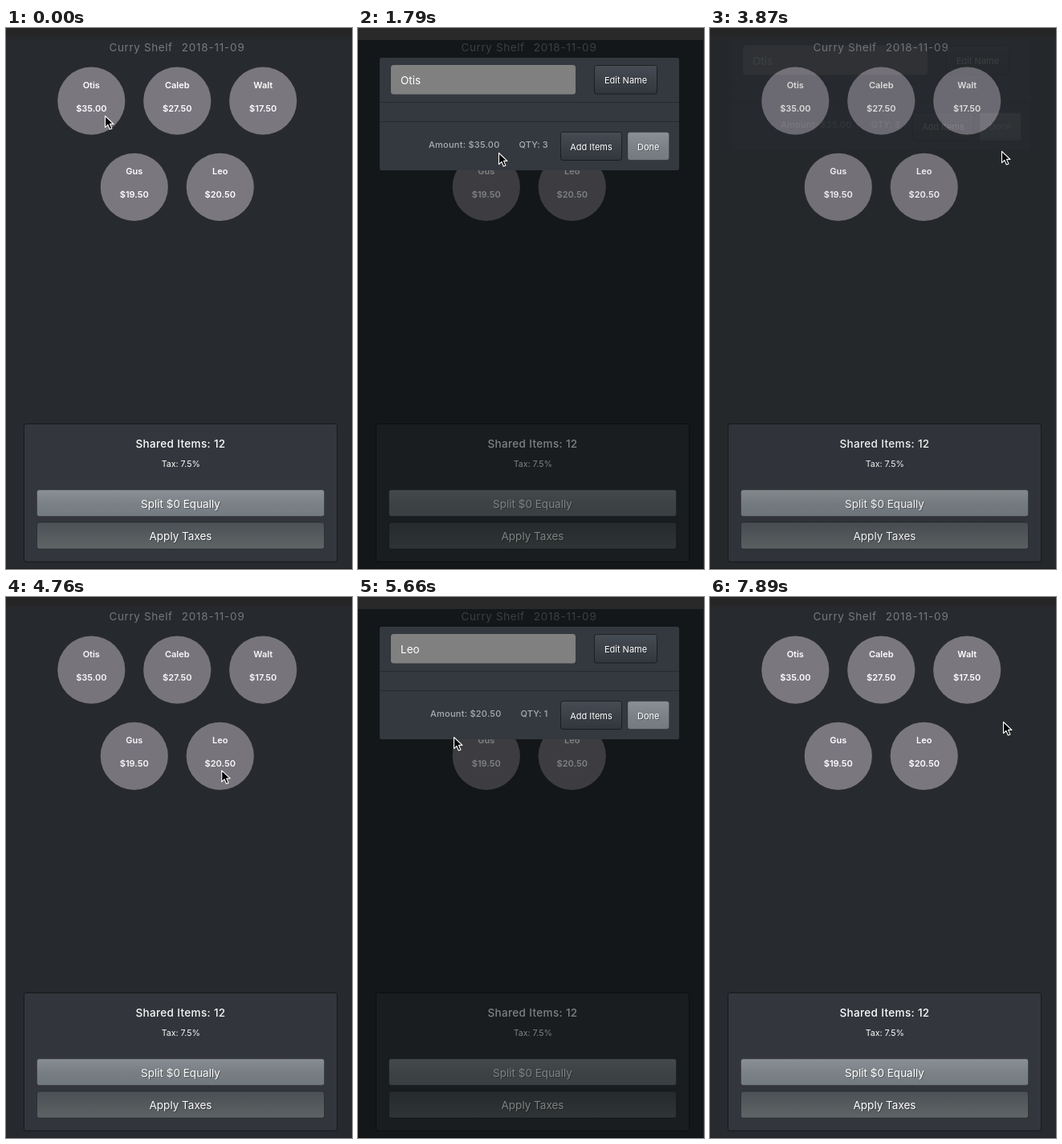
Recreate the animation shown at these times as an HTML page. Size 431 px wide and 673 px high, loop 8 s.

```html
<!DOCTYPE html>
<html lang="en">
<head>
<meta charset="utf-8">
<title>Bill split</title>
<style>
html, body { margin: 0; width: 100%; height: 100%; overflow: hidden; background: #272a2e; }
svg { display: block; width: 431px; height: 673px; }
text { font-family: Inter, Roboto, sans-serif; fill: #fff; white-space: pre; }
.muted { fill: #777a7f; }
.soft { fill: #aaadb0; }
.shade { fill: #000; }
</style>
</head>
<body>
<svg id="stage" viewBox="0 0 431 673" xmlns="http://www.w3.org/2000/svg"></svg>
<script>
const LOOP = 8000, TICK = 148.8;

const PEOPLE = [['Otis', 35], ['Caleb', 27.5], ['Walt', 17.5], ['Gus', 19.5], ['Leo', 20.5]];
const VISITS = [
  { who: 0, items: 3, open: 690, close: 3735, indent: 0 },
  { who: 4, items: 1, open: 4755, close: 7605, indent: 2 }
];

// Cursor moves: start, end, then where the tip comes to rest.
const MOVES = [
  [0, 140, 125, 109], [1190, 1790, 175, 155], [1790, 2080, 149, 159], [2080, 2680, 248, 154],
  [2830, 3220, 315, 161], [3220, 3570, 363, 153], [3870, 4460, 268.2, 215.3],
  [5060, 5660, 119, 174], [5660, 6400, 222, 139], [6400, 6990, 365, 155]
];

const clamp = k => Math.min(1, Math.max(0, k));
const easeOut = k => 1 - (1 - k) ** 2;
const easeInOut = k => (1 - Math.cos(Math.PI * k)) / 2;
const money = v => '$' + v.toFixed(2);
const $ = id => document.getElementById(id);

const text = (s, x, y, size, o = '') =>
  `<text x="${x}" y="${y}" font-size="${size}" ${o}>${s}</text>`;
const mid = (s, x, y, size, o = '') => text(s, x, y, size, `text-anchor="middle" ${o}`);
const rect = (x, y, w, h, fill, o = '') =>
  `<rect x="${x}" y="${y}" width="${w}" height="${h}" fill="${fill}" ${o}/>`;
const gradient = (id, ...stops) =>
  `<linearGradient id="${id}" x2="0" y2="1">${stops.map(([at, c]) =>
    `<stop offset="${at}" stop-color="${c}"/>`).join('')}</linearGradient>`;

function button(s, x, y, w, h, fill, size, edge) {
  const cx = x + w / 2, base = y + h / 2 + size * .364 + .6;
  return rect(x, y, w, h, `url(#${fill})`, `rx="3" stroke="#000" stroke-opacity="${edge}"`) +
    mid(s, cx + 1, base + 1, size, 'class="shade" opacity=".3"') + mid(s, cx, base, size);
}

// Three people in the first row, the rest centred below.
function person([name, sum], i) {
  const row = Math.floor(i / 3);
  const x = 106.3 + 106.95 * (i % 3 + row / 2), y = 90.7 + 107.1 * row;
  return `<circle cx="${x}" cy="${y}" r="42.1" fill="#7a777f"/>` +
    mid(name, x, y - 15.7, 11, 'font-weight="600"') +
    mid(money(sum), x, y + 12.8, 11, 'font-weight="600"');
}

$('stage').innerHTML = `
<defs>
  ${gradient('bar', [0, '#252525'], [.6, '#262627'], [1, '#272a2e'])}
  ${gradient('light', [0, '#8a9094'], [.55, '#7a8186'], [1, '#747a82'])}
  ${gradient('grey', [0, '#4c5155'], [1, '#5f6467'])}
  ${gradient('dark', [0, '#464c54'], [.6, '#3a3f46'], [1, '#32363c'])}
  <clipPath id="below"><rect y="15" width="430" height="658"/></clipPath>
</defs>
${rect(0, 0, 431, 673, '#272a2e')}
${rect(0, 0, 431, 15, 'url(#bar)')}
${rect(0, 672, 431, 1, '#1d1f22')}
${text('Curry Shelf', 128.5, 28.5, 13.5, 'class="muted" letter-spacing=".6"')}
${text('2018-11-09', 218.7, 28.5, 13.5, 'class="muted" letter-spacing=".8"')}
${PEOPLE.map(person).join('')}
${rect(22.5, 492.5, 390, 171.5, '#33373d', 'rx="2.5" stroke="#17191b"')}
${mid('Shared Items: 12', 217.5, 521.7, 13.5, 'font-weight="500" letter-spacing=".35"')}
${mid('Tax: 7.5%', 217.8, 546, 10.6)}
${button('Split $0 Equally', 38.5, 574.5, 358, 33, 'light', 13.5, .25)}
${button('Apply Taxes', 38.5, 615, 358, 33, 'grey', 13.5, .3)}
${rect(0, 15, 430, 658, '#010405', 'id="dim"')}
${rect(0, 0, 431, 15, '#292929', 'id="top"')}
<g clip-path="url(#below)"><g id="dialog">
  ${rect(27, 37, 373, 140, '#34393f', 'rx="2.5"')}
  ${rect(27, 92, 373, 1, '#272b30')}
  ${rect(27, 116, 373, 1, '#272b30')}
  ${rect(41, 46, 230, 36.5, '#808080', 'rx="3.5"')}
  ${text('', 53, 70, 13.5, 'id="name"')}
  ${button('Edit Name', 294.5, 46.5, 78, 35.5, 'dark', 11, .5)}
  <g id="totals" font-weight="500">
    ${text('', 88, 148.7, 11, 'id="amount" class="soft" letter-spacing=".25"')}
    ${text('', 200.5, 148.7, 11, 'id="count" class="soft" letter-spacing=".1"')}
  </g>
  ${button('Add Items', 252.5, 129.5, 76, 35, 'dark', 11, .5)}
  ${button('Done', 336, 129.8, 51.5, 34.5, 'light', 11, .15)}
</g></g>
<path id="cursor" d="M.5 .5V14.6L3.9 11.4L6.3 17L8.9 15.9L6.5 10.4H10.9Z"
  stroke="#fff" stroke-width="1.1" stroke-linejoin="round"/>`;

function cursorAt(t) {
  let x = 123, y = 109;
  for (const [from, to, tx, ty] of MOVES) {
    const k = easeInOut(clamp((t - from) / (to - from)));
    x += (tx - x) * k;
    y += (ty - y) * k;
  }
  return [x, y];
}

// The page darkens first, then the dialog fades in while sliding down.
function dialogAt(t, { open, close }) {
  const fade = from => clamp((t - from) / 150);
  const slide = from => easeOut(clamp((t - from) / 300));
  const shown = open + 150;
  return {
    dim: (fade(open) - fade(close)) / 2,
    opacity: fade(shown) - fade(close),
    shift: 35 * (slide(shown) - slide(close) - 1)
  };
}

function render(t) {
  const visit = VISITS[t < VISITS[1].open ? 0 : 1];
  const { dim, opacity, shift } = dialogAt(t, visit);
  const [name, sum] = PEOPLE[visit.who];
  $('dim').setAttribute('opacity', dim);
  $('top').setAttribute('opacity', dim * 2);
  $('dialog').setAttribute('opacity', opacity);
  $('dialog').setAttribute('transform', `translate(0 ${shift})`);
  $('name').textContent = name;
  $('amount').textContent = 'Amount: ' + money(sum);
  $('count').textContent = 'QTY: ' + visit.items;
  $('totals').setAttribute('transform', `translate(${visit.indent} 0)`);
  $('cursor').setAttribute('transform', `translate(${cursorAt(t).join(' ')})`);
}

const start = performance.now();
let last = -1;
function loop() {
  const t = (performance.now() - start) % LOOP;
  const n = Math.floor((t + 5) / TICK);
  if (n !== last) render((last = n) * TICK);
  requestAnimationFrame(loop);
}
loop();
</script>
</body>
</html>
```
